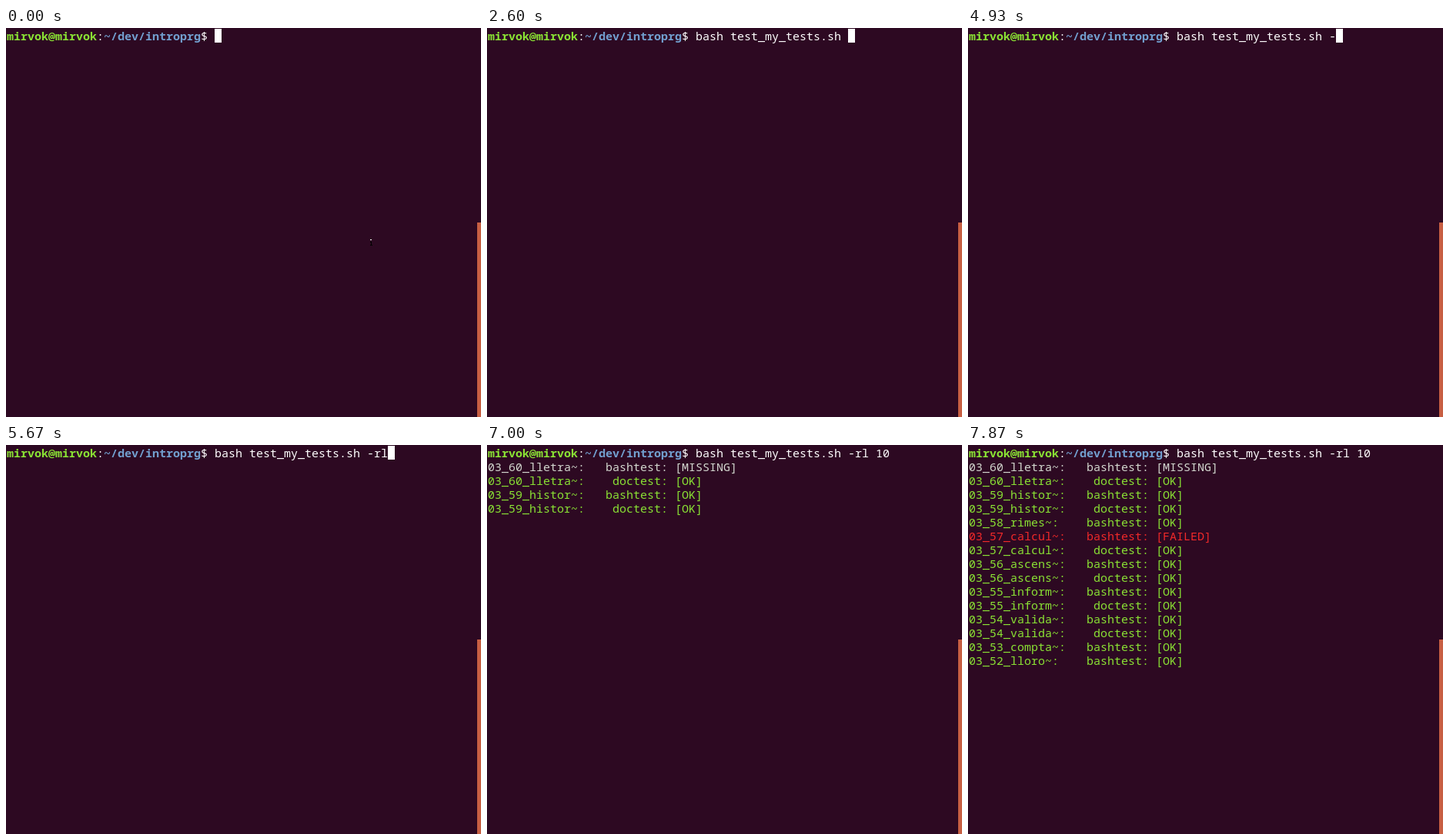
Recreate the animation shown at these times as an HTML page. Size 617 px wide and 506 px high, loop 8000 ms.

```html
<!DOCTYPE html>
<html lang="ca">
<head>
<meta charset="utf-8">
<style>
  html, body { margin: 0; width: 100%; height: 100%; overflow: hidden; background: #2d0922; }
  pre { position: absolute; left: 1px; top: 1px; margin: 0; color: #fff;
        font: 500 15px/18px "Noto Sans Mono", "DejaVu Sans Mono", monospace; }
  b { font-weight: 700; }
  .green { color: #8ae234; }
  .blue { color: #729fcf; }
  .red { color: #ef2929; }
  .grey { color: #d3d7cf; }
  #cursor { position: absolute; top: 1px; width: 9px; height: 18px; background: #fff; }
  #bar { position: absolute; left: 612px; top: 253px; width: 5px; height: 253px; background: #c75f43; }
  #pointer { position: absolute; left: 473px; top: 275px; }
</style>
</head>
<body>
<pre><b class="green">mirvok@mirvok</b>:<b class="blue">~/dev/introprg</b>$ <span id="command"></span>
<span id="output"></span></pre>
<div id="cursor"></div>
<div id="bar"></div>
<svg id="pointer" width="3" height="8"><path d="M0 0h2v1H0z" fill="#fff"/><path d="M0 3h2v1H0zM1 4h1v3H1zM0 7h3v1H0z"/></svg>
<script>
const LOOP = 8000, CELL = 9, COMMAND_X = 271;
const KEY_GAP = 60, BLINK_DELAY = 530, BLINK = 600;
const POINTER_HIDE = 1330, ENTER = 6870, PRINT_TIME = 1000;

// Bursts of keys struck KEY_GAP apart; Tab completes the file name.
const typed = (start, text) => [...text].map((key, i) => ({ at: start + i * KEY_GAP, text: key }));
const keys = [
  ...typed(1270, 'b'),
  ...typed(1470, 'ash '),
  ...typed(1870, 'te'),
  ...typed(2200, 'st'),
  { at: 2600, text: '_my_tests.sh ' },
  ...typed(3730, '-'),
  ...typed(5400, 'r'),
  ...typed(5670, 'l'),
  ...typed(6330, ' 10')
];

const exercises = ['lletra', 'histor', 'rimes', 'calcul', 'ascens', 'inform', 'valida', 'compta', 'lloro'];
const withoutDoctest = ['rimes', 'compta', 'lloro'];
const problems = { lletra: ['MISSING', 'grey'], calcul: ['FAILED', 'red'] };

function line(label, test, [status, color] = ['OK', 'green']) {
  return `<span class="${color}">${label.padEnd(17)}${test.padStart(8)}: [${status}]</span>`;
}

const results = exercises.flatMap((name, i) => {
  const label = `03_${60 - i}_${name}~:`;
  const lines = [line(label, 'bashtest', problems[name])];
  if (!withoutDoctest.includes(name)) lines.push(line(label, 'doctest'));
  return lines;
});

const [command, output, cursor, pointer] =
  ['command', 'output', 'cursor', 'pointer'].map(id => document.getElementById(id));
const show = (node, on) => node.style.visibility = on ? 'visible' : 'hidden';

function cursorOn(t, lastKey) {
  if (t >= ENTER) return false;
  const idle = lastKey ? t - lastKey.at - BLINK_DELAY : -1;
  return idle < 0 || Math.floor(idle / BLINK) % 2 === 1;
}

// Printing slows down as it goes.
function linesPrinted(t) {
  const progress = Math.max(0, t - ENTER) / PRINT_TIME;
  return Math.floor((results.length + 0.3) * progress ** 0.64);
}

let printed = -1;

function draw(t) {
  const struck = keys.filter(key => key.at <= t);
  const text = struck.map(key => key.text).join('');
  command.textContent = text;
  cursor.style.left = COMMAND_X + CELL * text.length + 'px';
  show(cursor, cursorOn(t, struck.at(-1)));
  show(pointer, t < POINTER_HIDE);
  const count = linesPrinted(t);
  if (count !== printed) {
    output.innerHTML = results.slice(0, count).join('\n');
    printed = count;
  }
}

const start = performance.now();
function tick() {
  draw((performance.now() - start) % LOOP);
  requestAnimationFrame(tick);
}
tick();
</script>
</body>
</html>
```
